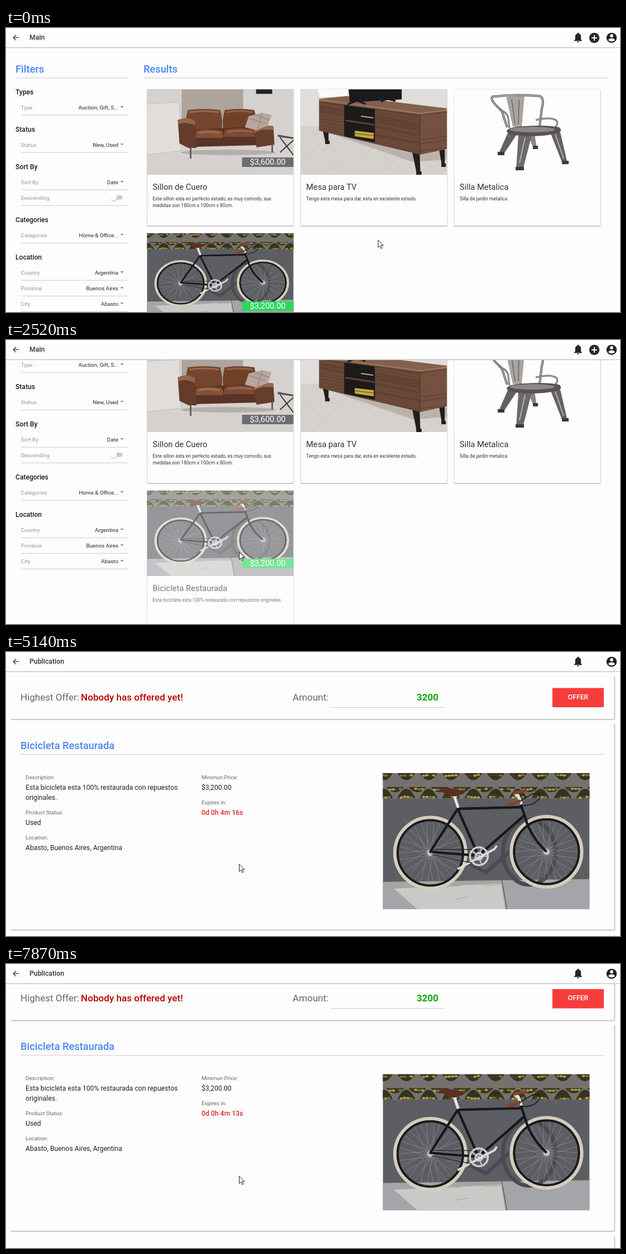
Recreate the animation shown at these times as an HTML page. Size 1099x509 px, loop 8 s.

```html
<!DOCTYPE html>
<html lang="es">
<head>
<meta charset="utf-8">
<title>Results</title>
<style>
html,body{margin:0;width:100%;height:100%;overflow:hidden;background:#fdfdfd}
svg{display:block}
#stage{width:100vw;height:100vh;font-family:Roboto,sans-serif}
</style>
</head>
<body>
<svg id="stage" viewBox="0 0 1099 509" xmlns="http://www.w3.org/2000/svg"></svg>
<script>
const stage = document.getElementById('stage');
const PAPER = '#fdfdfd', INK = '#262626', BLUE = '#4a86f5', RULE = '#cbcbcb';

const text = (x, y, s, size, fill = INK, weight = 400, anchor = 'start', id = '') =>
  `<text x="${x}" y="${y}" font-size="${size}" fill="${fill}" font-weight="${weight}" text-anchor="${anchor}"${id && ` id="${id}"`}>${s}</text>`;
const rect = (x, y, w, h, fill, extra = '') =>
  `<rect x="${x}" y="${y}" width="${w}" height="${h}" fill="${fill}" ${extra}/>`;
const rule = (x1, x2, y) => rect(x1, y, x2 - x1, 1, RULE);
const shape = (d, fill, extra = '') => `<path d="${d}" fill="${fill}" ${extra}/>`;
const line = (d, color, w = 1) =>
  `<path d="${d}" fill="none" stroke="${color}" stroke-width="${w}" stroke-linejoin="round"/>`;
const disc = (x, y, r, fill) => `<circle cx="${x}" cy="${y}" r="${r}" fill="${fill}"/>`;
const ring = (x, y, r, color, w) =>
  `<circle cx="${x}" cy="${y}" r="${r}" fill="none" stroke="${color}" stroke-width="${w}"/>`;
const oval = (x, y, rx, ry, fill) => `<ellipse cx="${x}" cy="${y}" rx="${rx}" ry="${ry}" fill="${fill}"/>`;
const times = (n, f) => Array.from({length: n}, (_, i) => f(i)).join('');

let seed = 7;
const random = () => (seed = seed * 16807 % 2147483647) / 2147483647;
const pick = list => list[Math.floor(random() * list.length)];

// A leg that narrows from width w at the top to half of it, with a dark foot.
function leg(x, y, x2, y2, w, fill, foot) {
  const v = w / 2;
  return shape(`M${x} ${y}h${w}L${x2 + v} ${y2}h${-v}Z`, fill) + rect(x2 - 1, y2 - 5, v + 3, 6, foot);
}

// ---- pictures ----
function wheel(x, y, r) {
  const spokes = times(30, i => {
    const a = i * Math.PI / 15, b = a + (i % 2 ? 1.2 : -1.2);
    const p = (q, k) => (x + Math.cos(q) * k).toFixed(1) + ' ' + (y + Math.sin(q) * k).toFixed(1);
    return `M${p(b, 5)}L${p(a, r - 10)}`;
  });
  return line(spokes, '#a2a2a2', .5) + ring(x, y, r - 3, '#d5cdbb', 6) +
    ring(x, y, r - 8, '#1b1b1e', 4) + disc(x, y, 5.5, '#c4c4c4');
}

// Pierced wall stones: a bowl in the upper row, a dome in the lower one.
function hole(x, y, h, up) {
  const base = up ? y + h : y, tip = up ? y - h * .7 : y + h * 1.7;
  const leaves = times(4, i => oval(x + 7 + i * 6, base + (up ? -3 : 3) + random() * 2, 3, 2,
    pick(['#8da33e', '#b89a4a', '#64802f', '#4c3c1e'])));
  return shape(`M${x} ${base}Q${x + 16} ${tip} ${x + 32} ${base}Z`, '#37321f') + leaves;
}

const bike = () => rect(0, 0, 370, 244, '#5d5e63') + rect(0, 0, 370, 46, '#75716f') +
  times(10, i => hole(i * 40 - 14, 0, 15) + hole(i * 40 - 14, 25, 20, true) + hole(i * 40 + 6, 25, 11)) +
  shape('M0 196L370 191V244H0Z', '#a3a5a9') + shape('M20 207L212 198L219 244H62Z', '#c9c9c7') +
  line('M0 196L370 191', '#aaa593', 2) + line('M213 192L222 244', '#55565a', 1.4) +
  line('M130 226l23-4M95 204l45-2M180 201l50-2', '#b5a27f') +
  `<g fill="none" stroke="#4a4b50" stroke-width="7"><ellipse cx="262" cy="142" rx="47" ry="58"/><path d="M150 160l35 18l43-38"/></g>` +
  wheel(85, 143, 66.5) + wheel(293, 141, 66) +
  line('M134 64L85 141L171 148L134 64L248 61M253 76L171 148M245 50L255 80Q263 112 293 141', '#17181d', 4.4) +
  line('M127 39L135 62M235 37L242 40L248 56', '#e6e5e2', 5) +
  shape('M101 28Q108 23 147 32Q150 37 127 42Q108 39 101 28Z', '#5b3023') +
  line('M233 36l25-5M223 58l23-8', '#81442b', 6) +
  line('M246 50L266 38Q286 32 279 47Q268 60 248 58', '#1a1b20', 1.7) +
  ring(172, 149, 16, '#cfcfcd', 3.5) + ring(172, 149, 6, '#c3c3c2', 4) +
  line(times(5, i => `M172 149l${Math.cos(i * 1.257) * 15} ${Math.sin(i * 1.257) * 15}`), '#c9c9c9', 2) +
  line('M134 172l13-7l53-29l4-6', '#dbdbda', 4) + line('M87 137h73M87 146l73 15', '#2a2a2d', 1.4);

const cushion = (x, y, w, h, fill, shine) =>
  shape(`M${x + 3} ${y + 2}Q${x + w / 2} ${y - 2} ${x + w - 3} ${y + 2}Q${x + w + 2} ${y + h / 2} ${x + w} ${y + h}H${x}Q${x - 2} ${y + h / 2} ${x + 3} ${y + 2}Z`, fill) +
  line(`M${x + 6} ${y + 6}Q${x + w / 2} ${y + 2} ${x + w - 6} ${y + 6}`, shine, 3);

const sofa = () => rect(0, 0, 262, 153, '#d5d1ce') + rect(62, 0, 110, 60, '#aca49d') +
  shape('M0 26L58 23L61 110L0 117Z', '#e0dddb') + line('M0 26L58 23L61 110L0 117', '#c4bfbb') +
  rect(195, 0, 29, 8, '#24242a') + oval(145, 113, 85, 5, '#b5aeaa') +
  cushion(70, 35, 64, 40, '#75452f', '#a0694b') + cushion(136, 35, 59, 38, '#704129', '#94603f') +
  shape('M84 72L190 67L198 100L84 103Z', '#593325') +
  cushion(86, 72, 50, 15, '#845139', '#a2704f') + cushion(138, 70, 56, 15, '#7c4b35', '#99664a') +
  shape('M55 55Q74 47 86 57L89 105H74L58 97Z', '#643c2c') + shape('M55 55Q74 47 86 57V65Q70 57 56 62Z', '#97644a') +
  shape('M190 70Q204 62 226 66L228 99L196 104Z', '#673d2c') + shape('M190 70Q204 62 226 66V73Q205 70 192 78Z', '#99664c') +
  shape('M182 48L206 42L223 46L216 65L196 73L175 68Z', '#b5a79e') +
  line('M183 52l29 9M194 46l25 9M206 42l-8 29', '#87786f') +
  line('M78 105V124M224 99V113', '#66615f', 3) +
  shape('M234 81L262 86V89L234 85Z', '#59514c') + line('M238 86l24 32M262 91l-24 22', '#40393a', 2);

const grain = (x, y, w, h, slope, rows) => times(rows, i => {
  const top = y + (i + .5) * h / rows, bend = random() * 4 - 2;
  return line(`M${x} ${top}q${w / 2} ${slope / 2 + bend} ${w} ${slope}`, pick(['#7f5640', '#55382a', '#785039']), .9);
});

const stand = () => rect(0, 0, 262, 153, '#d5d1cc') + rect(0, 0, 262, 66, '#e0dddb') +
  shape('M30 0H84V12L35 14Z', '#fafafa') +
  times(16, i => line(`M${i * 20 - 40} 153l75-75`, '#c6c0ba', .5) + line(`M${i * 20 - 60} 75l90 78`, '#cac4be', .5)) +
  shape('M48 77L212 117L262 109V126L200 130Z', '#bab3ac') +
  leg(40, 75, 45, 97, 10, '#241d1b', '#241d1b') + leg(200, 113, 208, 152, 13, '#241d1b', '#241d1b') +
  leg(248, 108, 253, 138, 10, '#241d1b', '#241d1b') +
  shape('M33 17L82 12L262 34V44L214 48L33 22Z', '#83604c') +
  shape('M33 22L214 46V117L33 74Z', '#664535') + shape('M214 46L262 40V107L214 117Z', '#755040') +
  grain(34, 23, 43, 52, 8, 9) + grain(134, 36, 79, 62, 15, 13) + grain(215, 46, 46, 68, -6, 10) +
  shape('M78 28L133 35V95L78 84Z', '#1d1a1b') + shape('M80 54L132 62V65L80 57Z', '#69412f') +
  line('M33 22L214 46L262 40M214 46V117', '#49332a') + line('M33 18L214 43L262 37', '#a17f6a', 1.4) +
  shape('M97 74l34 4v11l-34-5Z', '#c5a83d') + line('M98 79l33 4', '#57481f') + line('M108 48l22 3', '#b6aaa0', 2) +
  shape('M86 0H181V18L88 23Z', '#1b1a1e') + line('M84 27l17-7l15 6M144 22l11-5l15 4', '#19181b', 3);

const steel = (d, w) => line(d, '#65625f', w) + line(d, '#c2bfbb', w / 3);
const chair = () => rect(0, 0, 262, 153, PAPER) +
  steel('M95 68L85 38Q62 18 69 13Q110 8 154 12Q162 18 157 34L153 67', 4) +
  shape('M93 12H126L121 67H105Z', '#a8a5a1') + line('M103 18l6 44M116 18l-1 44', '#65615d', 1.4) +
  steel('M80 36Q96 41 97 53L99 70M146 55Q176 48 184 57Q187 62 180 69', 3) +
  leg(96, 78, 79, 117, 18, '#65615f', '#3b3938') + leg(132, 80, 142, 106, 12, '#888481', '#3b3938') +
  leg(115, 82, 111, 144, 24, '#6c6967', '#3b3938') + leg(172, 77, 194, 133, 18, '#65615f', '#3b3938') +
  line('M127 86L117 132M181 80l15 44', '#b4b1ad', 2) +
  shape('M94 74Q100 67 124 66Q166 63 188 68Q196 75 184 79Q152 86 122 83Q94 82 94 74Z', '#575352') +
  oval(140, 72, 40, 5, '#8b8885');

const photo = (x, y, art) => `<svg x="${x}" y="${y}" width="262" height="153">${art}</svg>`;
const bikeAt = (x, y, w, h) => `<use href="#bike" x="${x}" y="${y}" width="${w}" height="${h}"/>`;

// ---- page parts ----
const bell = x => shape(`M${x - 7} 23.3v-1l1.8-1.8v-5q0-4.5 4-5.4v-.6a1.2 1.2 0 0 1 2.4 0v.6q4 .9 4 5.4v5l1.8 1.8v1z`, '#242424') +
  shape(`M${x - 1.8} 24h3.6a1.8 1.8 0 0 1-3.6 0z`, '#242424');
const user = (x, y) => disc(x, y, 9.2, '#242424') + disc(x, y - 3.7, 2.8, '#fff') + oval(x, y + 3.7, 5.5, 2.8, '#fff');
const plus = (x, y) => disc(x, y, 9.2, '#242424') + line(`M${x} ${y - 5}v10M${x - 5} ${y}h10`, '#fff', 2);

const header = (title, extra = '') => rect(0, 0, 1099, 35, PAPER) + rect(0, 34.5, 1099, 1.5, '#c9c9c9') +
  line('M23 17.3H13.5M18 12.5l-4.8 4.8l4.8 4.8', '#333', 1.3) +
  text(42, 21.2, title, 12.3, '#333', 500) + bell(1024) + user(1084, 17.6) + extra;

const toggle = y => rect(190, y - 4, 18.5, 7.5, '#c9c9c9', 'rx="3.7"') + disc(193, y + .6, 6.2, '#c4c4c4') + disc(192.6, y - .5, 5.9, '#fff');
const choice = (y, s) => text(201, y + 3.5, s, 9.8, INK, 400, 'end') + shape(`M204.5 ${y - 2}h6l-3 3.2z`, '#8a8a8a');
const field = (y, label, value) => text(26.5, y + 3.5, label, 9.8, '#969696') +
  (value ? choice(y, value) : toggle(y)) + rule(27, 218, y + 13.6);

const FILTERS = {
  'Types': {'Type': 'Auction, Gift, S...'},
  'Status': {'Status': 'New, Used'},
  'Sort By': {'Sort By': 'Date', 'Descending': ''},
  'Categories': {'Categories': 'Home &amp; Office...'},
  'Location': {'Country': 'Argentina', 'Province': 'Buenos Aires', 'City': 'Abasto'}
};

function filters() {
  let y = 115, out = '';
  for (const [title, fields] of Object.entries(FILTERS)) {
    out += text(17, y + 4.2, title, 12.1, '#1c1c1c', 500);
    y += 27;
    for (const [label, value] of Object.entries(fields)) {
      out += field(y, label, value);
      y += 28.1;
    }
    y += 11.9;
  }
  return out;
}

function card(x, y, art, title, lines, price, color) {
  const tag = price ? rect(x + 170, y + 122, 92, 17, color) + text(x + 216, y + 135.3, price, 14.6, '#fff', 400, 'middle') : '';
  return rect(x, y, 262.5, 245, PAPER, 'stroke="#cfcfcf" rx="1"') + rect(x, y + 244.5, 262.5, 1.5, '#c4c4c4') + art + tag +
    text(x + 10, y + 180, title, 14.7, '#333') +
    lines.map((s, i) => text(x + 10, y + 199 + i * 12, s, 8.52, '#333')).join('');
}
const column = i => 252.5 + i * 274.8;
const item = (i, art, ...rest) => card(column(i), 110, photo(column(i), 110, art), ...rest);

const title = (x, end, y, s) => text(x, y, s, 18.3, BLUE, 500) + rule(x, end, y + 9);
const listing = () => title(17, 218, 80, 'Filters') + title(246, 1079, 80, 'Results') + filters() +
  item(0, sofa(), 'Sillon de Cuero',
    ['Este sillon esta en perfecto estado, es muy comodo, sus', 'medidas son 180cm x 100cm x 80cm.'], '$3,600.00', '#6d6d71') +
  item(1, stand(), 'Mesa para TV', ['Tengo esta mesa para dar, esta en excelente estado.']) +
  item(2, chair(), 'Silla Metalica', ['Silla de jardin metalica']) +
  `<g id="hover">${card(column(0), 368, bikeAt(column(0), 368, 262, 153), 'Bicicleta Restaurada',
    ['Esta bicicleta esta 100% restaurada con repuestos originales.'], '$3,200.00', '#2bd75c')}</g>`;

const panel = (y, h) => line(`M1089.3 ${y + 1}v${h - 3}q0 2 -3.3 2H9`, '#c8c8c8', 2);
const entry = (x, y, label, ...lines) => text(x, y, label, 9.8, '#666') +
  lines.map((s, i) => text(x, y + 19 + i * 18, s, 12.2, '#222')).join('');

const detail = () => panel(43.5, 77.5) + panel(128, 370.5) + panel(507, 120) +
  text(26, 86.5, 'Highest Offer:', 17, '#666') + text(134, 86.5, 'Nobody has offered yet!', 17.1, '#d40000', 500, 'start', 'alert') +
  text(513, 87, 'Amount:', 17.1, '#666') + rule(580, 783, 99) + text(774, 87, '3200', 17, '#13a313', 700, 'end') +
  rect(978, 64.5, 92, 34.5, '#f73c3c', 'rx="1.5"') + text(1024, 85, 'OFFER', 12.2, '#fff', 500, 'middle') +
  title(26, 1070, 174, 'Bicicleta Restaurada') +
  entry(35, 228, 'Description:', 'Esta bicicleta esta 100% restaurada con repuestos', 'originales.') +
  entry(35, 290.7, 'Product Status:', 'Used') + entry(35, 335.5, 'Location:', 'Abasto, Buenos Aires, Argentina') +
  entry(350, 228, 'Minimun Price:', '$3,200.00') + entry(350, 272.7, 'Expires in:') +
  text(350, 291.5, '', 12.2, '#e32626', 500, 'start', 'timer') + bikeAt(674.5, 217, 370, 244);

const edge = x => rect(x, 35, 1.5, 474, '#dedede');
stage.innerHTML =
  `<defs><symbol id="bike" viewBox="0 0 370 244" preserveAspectRatio="none">${bike()}</symbol></defs>` +
  rect(0, 0, 1099, 509, PAPER) + `<g id="list">${listing()}</g>` +
  `<g id="edges">${edge(6.5) + edge(228) + edge(235.5) + edge(1089)}</g>` + header('Main', plus(1053, 17.7)) +
  `<g id="page">${rect(0, 0, 1099, 509, PAPER)}<g id="body">${detail()}</g>${header('Publication')}</g>` +
  shape('M0 0V13.3L3 10.5L5.2 15.4L7.4 14.4L5.2 9.7H9.4Z', '#fff', 'id="cursor" stroke="#222" stroke-linejoin="round"');

// ---- motion ----
const LOOP = 8000;
const part = (t, from, to) => Math.min(1, Math.max(0, (t - from) / (to - from)));
const smooth = p => p * p * (3 - 2 * p);
const easeOut = p => 1 - (1 - p) ** 3;

const [list, hover, edges, page, body, alertText, timer, cursor] =
  ['list', 'hover', 'edges', 'page', 'body', 'alert', 'timer', 'cursor'].map(id => document.getElementById(id));
const move = (node, x, y) => node.setAttribute('transform', `translate(${x} ${y})`);

function draw(t) {
  const aside = smooth(part(t, 480, 800)), toCard = easeOut(part(t, 1300, 2520));
  move(cursor, 666 - 78 * aside - 170.5 * toCard, 380 + 5 * (aside - toCard));
  move(list, 0, -98 * smooth(part(t, 765, 1100)));
  hover.setAttribute('opacity', 1 - .36 * part(t, 1510, 1750));

  const fade = t < 3550 ? 0 : smooth(part(t, 3480, 3820));
  edges.setAttribute('opacity', Math.ceil(fade));
  page.setAttribute('display', fade ? 'inline' : 'none');
  page.setAttribute('opacity', fade);
  move(page, 0, 24 * (1 - fade));
  move(body, 0, -19.6 * smooth(part(t, 7730, 7870)));

  // The warning pulses between dark and bright red every two seconds.
  const pulse = Math.abs((t + 500) % 2000 - 1000) / 1000;
  alertText.setAttribute('fill', `rgb(${Math.round(253 - 108 * pulse)},0,0)`);

  const tick = Math.floor((t - 4450) / 1000);
  timer.textContent = tick < 0 ? '' : `0d 0h 4m ${16 - tick}s`;
}

const start = performance.now();
function loop() {
  draw((performance.now() - start) % LOOP);
  requestAnimationFrame(loop);
}
draw(0);
requestAnimationFrame(loop);
</script>
</body>
</html>
```
